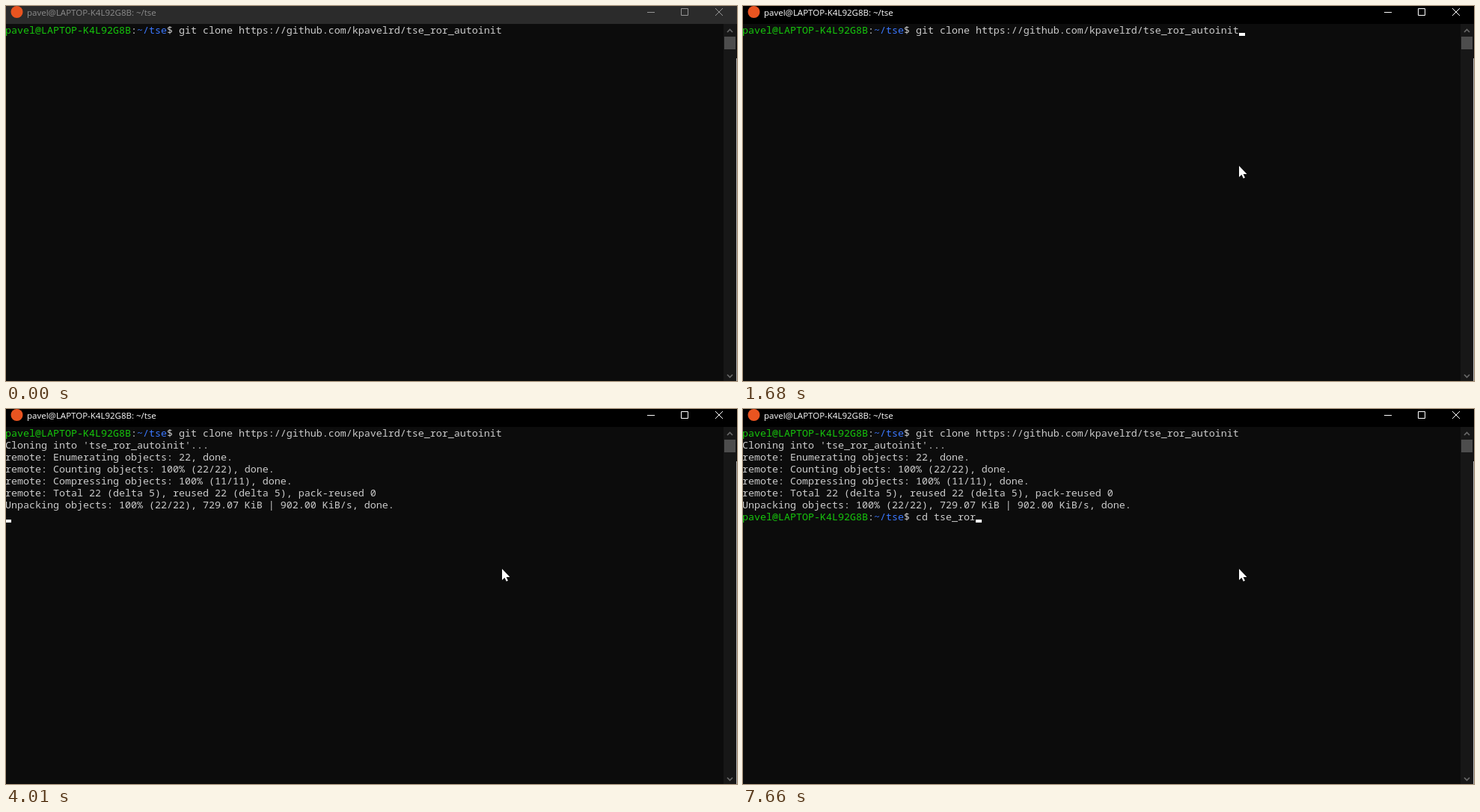
These frames come from a looping animation (977x502 px, 8000 ms). An HTML page:

```html
<!DOCTYPE html>
<html lang="en">
<head>
<meta charset="utf-8">
<title>Terminal</title>
<style>
  html, body { margin: 0; width: 100%; height: 100%; overflow: hidden; background: #0c0c0c; }
  svg { display: block; }
  text { white-space: pre; }
  #rows { font: 13.333px "Noto Sans Mono", monospace; fill: #ccc; }
  #title { font: 11.5px "Open Sans", sans-serif; }
  .user { fill: #16c60c; }
  .path { fill: #3b78ff; }
  .line { fill: none; }
</style>
</head>
<body>
<svg width="977" height="502" viewBox="0 0 977 502">
  <rect width="977" height="502" fill="#0c0c0c"/>
  <rect id="bar" width="977" height="24"/>
  <circle cx="14.5" cy="8" r="8" fill="#e95420"/>
  <text id="title" x="28" y="13">pavel@LAPTOP-K4L92G8B: ~/tse</text>
  <path id="buttons" class="line" d="M857 8.5h10M902.5 3.5h9v9h-9zM948 3l10 10m0-10l-10 10"/>

  <rect x="959" y="24" width="17" height="478" fill="#171717"/>
  <rect x="960" y="41" width="15" height="17" fill="#4d4d4d"/>
  <path class="line" stroke="#686868" stroke-width="1.7" d="M964 35l3.5-3.5 3.5 3.5M964 493.5l3.5 3.5 3.5-3.5"/>
  <path class="line" stroke="#b4b4b4" d="M976.5 70v432"/>

  <g id="rows"></g>
  <rect id="caret" width="8" height="4" fill="#fff"/>
  <circle id="click" cx="662" cy="212" r="12" fill="#ff0" opacity=".48"/>
  <path id="mouse" fill="#fff" d="M0 0V15L3.400 11.800 5.800 16.800 7.900 15.800 5.600 10.900H10.400Z"/>
</svg>
<script>
const $ = id => document.getElementById(id);
const LOOP = 8000, CELL = 8, ROW = 16, TOP = 24;
const PROMPT_COLS = 29, COMMAND_COLS = 83;
const FOCUS = 1130, CLICK = 250, ENTER = 1680, IDLE = 700;
const prompt = '<tspan class="user">pavel@LAPTOP-K4L92G8B</tspan>:<tspan class="path">~/tse</tspan>$ ';

// each line with the time it is printed
const lines = [
  [0, prompt + 'git clone https://github.com/kpavelrd/tse_ror_autoinit'],
  [1990, "Cloning into 'tse_ror_autoinit'..."],
  [3150, 'remote: Enumerating objects: 22, done.'],
  [3230, 'remote: Counting objects: 100% (22/22), done.'],
  [3310, 'remote: Compressing objects: 100% (11/11), done.'],
  [4010, 'remote: Total 22 (delta 5), reused 22 (delta 5), pack-reused 0'],
  [4010, 'Unpacking objects: 100% (22/22), 729.07 KiB | 902.00 KiB/s, done.'],
  [4160, prompt + '<tspan id="typed"></tspan>']
];
const LAST = lines.length - 1;

// bursts of typing: text, first key, time between keys
const bursts = [['cd', 4860, 80], [' ', 5490, 0], ['tse_ror', 6650, 168]];
const keys = bursts.flatMap(([text, start, gap]) =>
  [...text].map((char, i) => ({ char, time: start + i * gap })));

const events = [ENTER, ...lines.map(line => line[0]), ...keys.map(key => key.time)];

$('rows').innerHTML = lines.map(([, line], i) =>
  `<text x="-1" y="${TOP + ROW * i + 13}">${line}</text>`).join('');
const rows = [...$('rows').children];

const show = (el, on) => el.setAttribute('visibility', on ? 'visible' : 'hidden');
const set = (id, attrs) => {
  for (const name in attrs) $(id).setAttribute(name, attrs[name]);
};
// progress of a pointer move in two hops
const hop = time => Math.min(2, Math.max(0, Math.floor(time / 75))) / 2;

function draw(now) {
  const t = now % LOOP, active = t >= FOCUS;
  set('bar', { fill: active ? '#000' : '#2b2b2b' });
  set('title', { fill: active ? '#fff' : '#8c8c8c' });
  set('buttons', { stroke: active ? '#fff' : '#959595' });

  const typed = keys.filter(key => key.time <= t).map(key => key.char).join('');
  const count = lines.filter(([time]) => time <= t).length;
  rows.forEach((row, i) => show(row, i < count));
  $('typed').textContent = typed;

  let row = count, col = 0;
  if (count === 1) [row, col] = [0, COMMAND_COLS];
  if (count > LAST) [row, col] = [LAST, PROMPT_COLS + typed.length];
  set('caret', { x: col * CELL - 1, y: TOP + ROW * row + 12 });
  const latest = Math.max(...events.filter(time => time <= t));
  show($('caret'), t >= ENTER && t - latest < IDLE);

  const down = hop(t - 370), left = hop(t - 750);
  const x = 821 - 43 * down - 115 * left, y = 331 - 109 * down - 8 * left;
  set('mouse', { transform: `translate(${x} ${y})` });
  show($('mouse'), t >= 370);
  show($('click'), active && t < FOCUS + CLICK);
  requestAnimationFrame(draw);
}
draw(performance.now());
</script>
</body>
</html>
```
